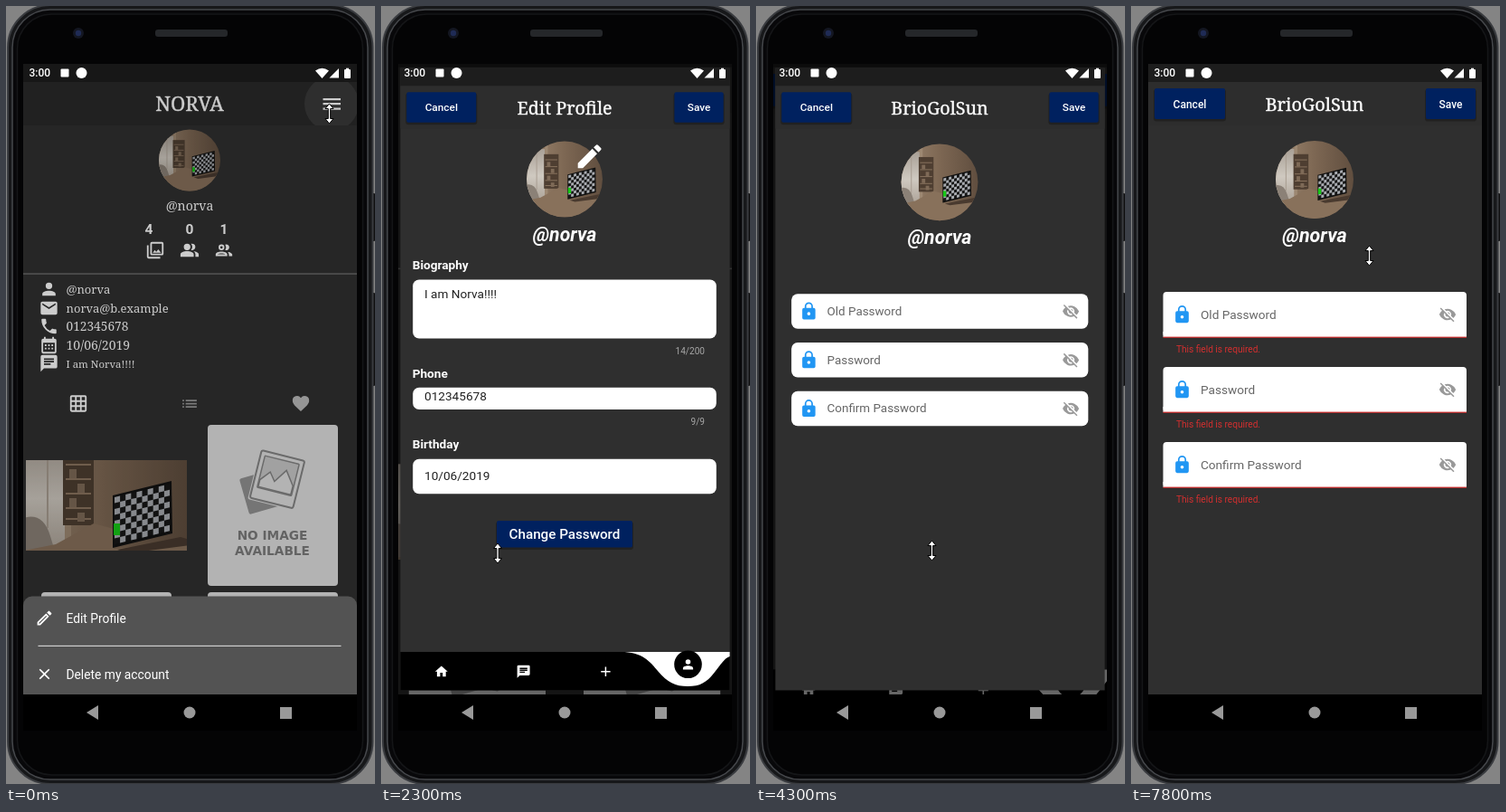
Write an HTML page that moves like this. It is 408x860 px and loops after 8000 ms.

```html
<!DOCTYPE html>
<html lang="en">
<head>
<meta charset="utf-8">
<title>Profile editor</title>
<style>
html, body { margin: 0; width: 100%; height: 100%; overflow: hidden; background: #848484; }
svg { display: block; width: 100vw; height: 100vh; }
text { font-family: Roboto, sans-serif; white-space: pre; }
.serif { font-family: "Noto Serif", serif; }
.wide { font-family: "DejaVu Sans", sans-serif; }
</style>
</head>
<body>
<svg id="stage" viewBox="0 0 408 860" xmlns="http://www.w3.org/2000/svg"></svg>
<script>
const LOOP = 8000;
const NAVY = '#00215f';

// Icon outlines on a 24 unit square
const icons = {
  person: 'M8 8a4 4 0 1 0 8 0a4 4 0 1 0-8 0M4 20v-2c0-5.3 16-5.3 16 0v2z',
  mail: 'M4 4h16a2 2 0 0 1 2 2v12a2 2 0 0 1-2 2H4a2 2 0 0 1-2-2V6a2 2 0 0 1 2-2zM20 6l-8 5-8-5v2l8 5 8-5z',
  phone: 'M6.6 10.8a15 15 0 0 0 6.6 6.6l2.2-2.2a1 1 0 0 1 1-.3a11 11 0 0 0 3.6.6a1 1 0 0 1 1 1V20a1 1 0 0 1-1 1A17 17 0 0 1 3 4a1 1 0 0 1 1-1h3.5a1 1 0 0 1 1 1a11 11 0 0 0 .6 3.6a1 1 0 0 1-.3 1z',
  date: 'M6 2h2v2h8V2h2v2h1a2 2 0 0 1 2 2v14a2 2 0 0 1-2 2H5a2 2 0 0 1-2-2V6a2 2 0 0 1 2-2h1zM5 9v11h14V9zM7 11h2v2H7zM11 11h2v2h-2zM15 11h2v2h-2zM7 15h2v2H7zM11 15h2v2h-2zM15 15h2v2h-2z',
  chat: 'M4 2h16a2 2 0 0 1 2 2v12a2 2 0 0 1-2 2H6l-4 4V4a2 2 0 0 1 2-2zM6 6v2h12V6zM6 9v2h12V9zM6 12v2h8v-2z',
  grid: 'M4 2h16a2 2 0 0 1 2 2v16a2 2 0 0 1-2 2H4a2 2 0 0 1-2-2V4a2 2 0 0 1 2-2z' +
    [4, 10, 16].map(x => [4, 10, 16].map(y => `M${x} ${y}h4v4h-4z`).join('')).join(''),
  list: [7, 11, 15].map(y => `M3 ${y}h2v2H3zM7 ${y}h14v2H7z`).join(''),
  heart: 'M12 21.3C5.4 15.4 2 12.3 2 8.5A5.5 5.5 0 0 1 12 5.1A5.5 5.5 0 0 1 22 8.5C22 12.3 18.6 15.4 12 21.3z',
  pencil: 'M3 17.2V21h3.8L17.8 9.9l-3.7-3.7zM20.7 7a1 1 0 0 0 0-1.4l-2.3-2.3a1 1 0 0 0-1.4 0l-1.9 1.8 3.8 3.8z',
  pencilLine: 'M3 17.2V21h3.8L17.8 9.9l-3.7-3.7zM5 18.1V19h.9l9.1-9.1-.9-.9zM20.7 7a1 1 0 0 0 0-1.4l-2.3-2.3a1 1 0 0 0-1.4 0l-1.9 1.8 3.8 3.8z',
  close: 'M19 6.4L17.6 5 12 10.6 6.4 5 5 6.4 10.6 12 5 17.6 6.4 19 12 13.4 17.6 19 19 17.6 13.4 12z',
  exit: 'M17 7l-1.4 1.4L18.2 11H8v2h10.2l-2.6 2.6L17 17l5-5zM12 3H4a2 2 0 0 0-2 2v14a2 2 0 0 0 2 2h8v-2H4V5h8z',
  home: 'M10 20v-6h4v6h5v-8h3L12 3 2 12h3v8z',
  plus: 'M19 13h-6v6h-2v-6H5v-2h6V5h2v6h6z',
  lock: 'M6 8h1V6a5 5 0 0 1 10 0v2h1a2 2 0 0 1 2 2v10a2 2 0 0 1-2 2H6a2 2 0 0 1-2-2V10a2 2 0 0 1 2-2zM8.9 8h6.2V6a3.1 3.1 0 0 0-6.2 0zM10 15a2 2 0 1 0 4 0a2 2 0 1 0-4 0',
  hidden: 'M12 7a5 5 0 0 1 4.6 6.8l3 3A12 12 0 0 0 23 12A11.8 11.8 0 0 0 8 5.2l2.2 2.2A5 5 0 0 1 12 7zM2 4.3L4.7 7A12 12 0 0 0 1 12a11.8 11.8 0 0 0 15.4 6.7l3.3 3.3 1.3-1.3L3.3 3zM7.5 9.8l1.6 1.5a3 3 0 0 0 3.6 3.6l1.5 1.6A5 5 0 0 1 7.5 9.8zM11.8 9l3.2 3.2A3 3 0 0 0 11.8 9z',
  album: 'M8 2h12a2 2 0 0 1 2 2v12a2 2 0 0 1-2 2H8a2 2 0 0 1-2-2V4a2 2 0 0 1 2-2zM8 4v12h12V4zM11.5 11.7l1.7 2.2 2.5-3.1L19 15H9zM2 6v14a2 2 0 0 0 2 2h14v-2H4V6z',
  people: 'M5 8a4 4 0 1 0 8 0a4 4 0 1 0-8 0M1 20v-3c0-5.3 16-5.3 16 0v3zM13.7 4.2a4 4 0 1 1 0 7.6a6 6 0 0 0 0-7.6zM16.7 13.1c2.8.4 6.3 1.7 6.3 3.9v3h-4v-3c0-1.7-1-3-2.3-3.9z',
  peopleLine: 'M5.5 8.5a3.5 3.5 0 1 0 7 0a3.5 3.5 0 1 0-7 0M7.5 8.5a1.5 1.5 0 1 0 3 0a1.5 1.5 0 1 0-3 0M2 19v-1.8c0-4.6 14-4.6 14 0V19zM4.3 17h9.4c-2-1.6-7.4-1.6-9.4 0zM13.5 5.3a3.5 3.5 0 1 1 0 6.4a6 6 0 0 0 0-6.4zM16 13.8c2.5.3 6 1.4 6 3.4V19h-4v-1.8c0-1.4-.8-2.6-2-3.4z'
};

const rect = (x, y, w, h, fill, r = 0, more = '') =>
  `<rect x="${x}" y="${y}" width="${w}" height="${h}" rx="${r}" fill="${fill}" ${more}/>`;
const disc = (x, y, r, fill, more = '') => `<circle cx="${x}" cy="${y}" r="${r}" fill="${fill}" ${more}/>`;
const shape = (d, fill, more = '') => `<path d="${d}" fill="${fill}" ${more}/>`;
const text = (x, y, size, words, fill = '#fff', more = '') =>
  `<text x="${x}" y="${y}" font-size="${size}" fill="${fill}" ${more}>${words}</text>`;
const icon = (name, x, y, size = 22, fill = '#fff') =>
  `<path d="${icons[name]}" fill="${fill}" fill-rule="evenodd" transform="translate(${x - size / 2} ${y - size / 2}) scale(${size / 24})"/>`;
const MID = 'text-anchor="middle"';
const BOLD = 'font-weight="700"';
const MEDIUM = 'font-weight="500"';

function button(x, y, w, h, size, words, base) {
  return rect(x - 1, y + 1, w + 2, h + 1.5, '#000', 3, 'opacity=".28"') + rect(x, y, w, h, NAVY, 2) +
    text(x + w / 2, base, size, words, '#fff', `${MID} ${MEDIUM}`);
}

const title = (words, size) =>
  text(203, 116, size, words, '#fff', `${MID} class="serif" stroke="#fff" stroke-width=".35"`);

const base = (bar) => rect(19, 64, 369, 697, '#2f2f2f') + rect(19, 84, 369, 48, bar) + rect(19, 64, 369, 20, '#1d1d1d');

// Room picture around its own centre
function room() {
  let cells = '';
  for (let r = 0; r < 8; r++)
    for (let c = r % 2; c < 10; c += 2) cells += `M${c * 6.1} ${r * 6.5}h6.1v6.5h-6.1z`;
  const shelves = [-46, -30, -14, 2, 14].map(y => rect(-45, y, 28, 2, '#8a745f')).join('');
  const books = [0, 1, 2, 3].map(i => rect(-41 + i % 2 * 9, -40 + i * 16, 8, 10, '#7e6a57')).join('');
  return rect(-92, -115, 184, 230, 'url(#wall)') +
    rect(-92, -70, 46, 125, 'url(#light)') + rect(-66, -70, 2, 95, '#a79c90') + rect(-46, -115, 7, 155, '#9d8872') +
    shape('M-92 14q22-7 30 20l6 20h-36z', '#8b8177') +
    rect(-48, -58, 34, 80, '#4e3e31') + shelves + books +
    shape('M-56 43L-14 20 8 26V48L92 40V115H-92V50z', '#88715b') +
    shape('M12 49L82 35 92 38V44L24 53z', '#493a2f') +
    shape('M7-11L72-27 73 31 7 47z', '#111') +
    `<g transform="matrix(1 -.24 0 1 9 -9)">${rect(0, 0, 61, 52, '#171717') + shape(cells, '#a8abb0')}</g>` +
    rect(8, 20, 7, 13, '#16c816');
}

const avatar = (y, r) => `<g transform="translate(203 ${y})"><g clip-path="url(#round)" transform="scale(${r / 34})">` +
  `<use href="#room" transform="scale(.385)"/></g></g>`;

function emptyTile(x, y) {
  const lines = '#858585';
  return rect(x, y, 144, 178, '#e0e0e0', 4) +
    `<g transform="translate(${x + 71} ${y + 62})">` +
    `<g transform="rotate(-16 -10 9)">${rect(-32, -9, 44, 41, '#929292', 2)}</g>` +
    `<g transform="rotate(14 5 0)">${rect(-21, -31, 53, 58, '#e0e0e0', 2) +
      rect(-19, -29, 49, 54, 'none', 2, `stroke="${lines}" stroke-width="2"`) +
      rect(-14, -24, 39, 36, '#c9c9c9', 1, `stroke="${lines}" stroke-width="1.5"`) +
      shape('M-13 11V3L-4-8 3 1 13-14 24 1V11z', '#e0e0e0', `stroke="${lines}" stroke-width="1.5"`)}</g></g>` +
    text(x + 71.5, y + 127, 13.7, 'NO IMAGE', '#7c7c7c', `${MID} ${BOLD} class="wide"`) +
    text(x + 71.5, y + 144, 13.7, 'AVAILABLE', '#7c7c7c', `${MID} ${BOLD} class="wide"`);
}

function profilePage() {
  const info = [
    ['person', 313, 13, '@norva'], ['mail', 334, 13, 'norva@b.example'], ['phone', 354, 13.7, '012345678'],
    ['date', 375, 14, '10/06/2019'], ['chat', 395, 11.4, 'I am Norva!!!!']
  ].map(([name, y, size, words]) =>
    icon(name, 47.5, y) + text(66.5, y + 5, size, words, '#fff', 'class="serif"')).join('');
  const stats = [['4', 158, 165, 'album'], ['0', 203, 203, 'people'], ['1', 241, 241, 'peopleLine']]
    .map(([n, x, ix, name]) => text(x, 252, 15.5, n, '#fff', `${MID} ${BOLD}`) + icon(name, ix, 270)).join('');
  return base('#292929') +
    text(203, 116, 22, 'NORVA', '#fff', `${MID} class="serif" stroke="#fff" stroke-width=".4"`) +
    [102, 107, 112.5].map(y => rect(350.5, y, 19.5, 2.2, '#fff')).join('') +
    avatar(170.5, 34) + text(203, 226, 14, '@norva', '#fff', `${MID} class="serif"`) + stats +
    rect(19, 295.3, 369, 1.5, '#6a6a6a') + info +
    icon('grid', 80, 439.5) + icon('list', 203, 439.5, 21, '#999') + icon('heart', 326, 439.5, 22, '#bbb') +
    `<g transform="translate(111 552)"><g clip-path="url(#frame)"><use href="#room"/></g></g>` +
    emptyTile(223, 463) + emptyTile(39, 648) + emptyTile(223, 648);
}

function sheet() {
  const rows = [['pencilLine', 605, 21, 'Edit Profile'], ['close', 667, 20, 'Delete my account'], ['exit', 728, 21, 'Logout']];
  return rect(19, 581, 369, 180, '#535353', 10) +
    rows.map(([name, y, size, words]) => icon(name, 42.5, y, size) + text(66.5, y + 5, 13.8, words)).join('') +
    rect(35.5, 635.3, 335, 1.2, '#d0d0d0') + rect(35.5, 696.8, 335, 1.2, '#bdbdbd');
}

function editPage() {
  const label = (y, words) => text(32.5, y, 13.8, words, '#fff', BOLD);
  const box = (y, h, by, words) => rect(33, y, 340, h, '#fff', 7) + text(46, by, 13.8, words, '#222');
  const count = (y, words) => text(360, y, 10.2, words, '#a8a8a8', 'text-anchor="end"');
  return base('#2d2d2d') + button(26, 91, 78, 34, 12, 'Cancel', 112.5) + button(326, 91, 55, 34, 12, 'Save', 112.5) +
    title('Edit Profile', 20) + avatar(188.5, 42.5) + icon('pencil', 231, 163, 35) +
    text(203, 258, 21.5, '@norva', '#fff', `${MID} ${BOLD} font-style="italic"`) +
    label(289, 'Biography') + box(301, 66, 322, 'I am Norva!!!!') + count(385, '14/200') +
    label(411, 'Phone') + box(422, 24.5, 436.5, '012345678') + count(464, '9/9') +
    label(490.5, 'Birthday') + box(502, 39, 525.5, '10/06/2019') +
    button(127, 571, 152, 30, 15.4, 'Change Password', 591.5) +
    rect(19, 718, 369, 43, '#000') +
    shape('M266 718C290 718 298 728 308 740S327 756.5 341 756.5 362 752 370 742 382 725 388 723V718z', '#fff') +
    disc(341.3, 732, 15.5, '#000') + icon('person', 341.3, 732, 17) +
    icon('home', 65, 740, 17) + icon('chat', 157, 740, 17) + icon('plus', 249, 740, 18);
}

function passPage() {
  const names = ['Old Password', 'Password', 'Confirm Password'];
  const inner = (y, words) => icon('lock', 56.5, y, 22, '#2196f3') +
    text(77, y + 4.5, 13.6, words, '#666') + icon('hidden', 350, y, 20, '#999');
  const plain = names.map((n, i) => rect(37, 317 + i * 54.5, 332.5, 39, '#fff', 7) + inner(336.5 + i * 54.5, n)).join('');
  const bad = names.map((n, i) => {
    const y = 316 + i * 83;
    return rect(35.5, y, 335.5, 50, '#fff', 4) + rect(35.5, y + 44, 335.5, 6, '#fff') +
      rect(35.5, y + 49.6, 335.5, 1.2, '#d32f2f') + inner(y + 25, n);
  }).join('');
  const notes = names.map((n, i) => text(50, 382.5 + i * 83, 10.1, 'This field is required.', '#d32f2f')).join('');
  return base('#2d2d2d') + button(26, 91, 78, 34, 12, 'Cancel', 112.5) + button(326, 91, 55, 34, 12, 'Save', 112.5) +
    rect(326, 91, 55, 34, '#fff', 2, 'id="press" opacity="0"') +
    title('BrioGolSun', 20) + avatar(192, 43) +
    text(203, 261, 21.5, '@norva', '#fff', `${MID} ${BOLD} font-style="italic"`) +
    `<g id="plain">${plain}</g><g id="bad">${bad}</g><g id="notes">${notes}</g>`;
}

const phone = () =>
  rect(0, 0, 408, 860, '#848484') +
  rect(404, 207, 4, 53, '#111', 1) + rect(404, 317, 4, 103, '#111', 1) +
  rect(2, -1, 403.5, 861, '#17181a', 47, 'stroke="#3a3c40" stroke-width="2"') +
  rect(7, 4, 393, 851, '#08080a', 42, 'stroke="#46484c" stroke-width="1.5"') +
  rect(12.5, 9, 382, 841, '#040405', 38, 'stroke="#151618" stroke-width="1.5"') +
  disc(80, 30, 6, '#141722') + disc(80, 30, 3.2, '#1f2b55') +
  rect(165, 26, 80, 8, '#25272a', 3) + rect(19, 761, 369, 40, '#000');

const overlay = () =>
  text(25.5, 78.3, 12, '3:00', '#fff', MEDIUM) + rect(60.5, 69.5, 9, 9, '#fff', 1) + disc(83.5, 74, 6, '#fff') +
  shape('M342 71.5Q349.5 66 357 71.5L349.5 80z', '#fff') + shape('M368 69V79.5H357.5z', '#fff') +
  rect(374, 70, 7, 10, '#fff', 1) + rect(376, 68.7, 3, 2, '#fff') +
  shape('M89 781L102 773V789z', '#999') + disc(203, 781, 6.5, '#999') + rect(303, 775, 13, 13, '#999');

document.getElementById('stage').innerHTML = `
<defs>
  <linearGradient id="wall"><stop offset="0" stop-color="#a08a73"/><stop offset=".5" stop-color="#7d6753"/><stop offset="1" stop-color="#5f4d3e"/></linearGradient>
  <linearGradient id="light" x2="0" y2="1"><stop stop-color="#a9a096"/><stop offset=".5" stop-color="#cfc9c0"/><stop offset="1" stop-color="#aaa095"/></linearGradient>
  <clipPath id="round"><circle r="34"/></clipPath>
  <clipPath id="frame"><rect x="-89" y="-50" width="178" height="100"/></clipPath>
  <clipPath id="screen"><rect x="19" y="64" width="369" height="697"/></clipPath>
  <clipPath id="bar"><rect x="19" y="84" width="369" height="48"/></clipPath>
  <g id="room">${room()}</g>
</defs>
${phone()}
<g clip-path="url(#screen)">
  <rect x="19" y="64" width="369" height="697"/>
  <g id="profile">${profilePage()}
    <g clip-path="url(#bar)">${disc(360, 108, 30, '#fff', 'id="ripple"')}</g></g>
  <rect id="scrim" x="19" y="64" width="369" height="697"/>
  <g id="sheet">${sheet()}</g>
  <g id="edit">${editPage()}</g>
  <rect id="shade" x="19" y="64" width="369" height="697" opacity=".6"/>
  <g id="pass">${passPage()}</g>
</g>
${overlay()}
<g id="pointer">${shape('M0-11L4.5-5.5H1.2V5.5H4.5L0 11-4.5 5.5H-1.2V-5.5H-4.5z', '#fff', 'stroke="#000" stroke-width="1" stroke-linejoin="round"')}</g>`;

const el = {};
document.querySelectorAll('svg [id]').forEach(n => el[n.id] = n);

// [start ms, pointer x, pointer y, changes to the state]
const steps = [
  [0, 357.5, 119, { page: 'menu', scrim: .2, drop: 71.5, ripple: .08, notes: 0, press: 0, bad: 0 }],
  [300, 357.5, 119, { scrim: .54, drop: 0, ripple: .03 }],
  [500, 228, 165, { ripple: 0 }],
  [800, 172, 430],
  [1000, 134, 604],
  [1500, 129, 609],
  [2000, 129, 605],
  [2300, 129, 605, { page: 'edit', enter: 1 }],
  [2500, 129, 605, { enter: 0 }],
  [2800, 160, 606],
  [3000, 213, 590],
  [3300, 182, 598],
  [3500, 194.5, 602],
  [4300, 194.5, 602, { page: 'pass', enter: 1 }],
  [4500, 194.5, 602, { enter: 0 }],
  [4800, 222, 460],
  [5000, 253, 291],
  [5300, 369, 131],
  [5500, 361, 132],
  [5800, 361, 114],
  [6000, 350.5, 120],
  [6500, 350.5, 120, { bad: 1, press: .14 }],
  [6800, 360, 116, { notes: 1, press: .05 }],
  [7000, 369, 114, { press: 0 }],
  [7800, 263.5, 276]
];

const show = (node, on) => node.setAttribute('display', on ? 'inline' : 'none');
const fade = (node, a) => node.setAttribute('opacity', a);
const zoom = (node, k) => node.setAttribute('transform', `translate(203 410) scale(${k}) translate(-203 -410)`);

function render(t) {
  const s = { enter: 0 };
  for (const [start, x, y, change] of steps)
    if (t >= start) Object.assign(s, { x, y }, change);
  const { page, enter } = s;
  const menu = page === 'menu';
  show(el.profile, menu || page === 'edit' && enter);
  show(el.scrim, menu || page === 'edit' && enter);
  show(el.sheet, menu);
  show(el.edit, page === 'edit' || page === 'pass' && enter);
  show(el.shade, page === 'pass' && enter);
  show(el.pass, page === 'pass');
  zoom(el.profile, menu ? 1 : 1.05);
  zoom(el.edit, enter ? (page === 'edit' ? .987 : 1.05) : 1);
  zoom(el.pass, enter ? .987 : 1);
  fade(el.scrim, s.scrim);
  fade(el.ripple, s.ripple);
  fade(el.press, s.press);
  fade(el.notes, s.notes);
  show(el.plain, !s.bad);
  show(el.bad, s.bad);
  el.sheet.setAttribute('transform', `translate(0 ${s.drop})`);
  el.pointer.setAttribute('transform', `translate(${s.x} ${s.y})`);
}

const origin = performance.now();
function tick() {
  render((performance.now() - origin) % LOOP);
  requestAnimationFrame(tick);
}
tick();
</script>
</body>
</html>
```
